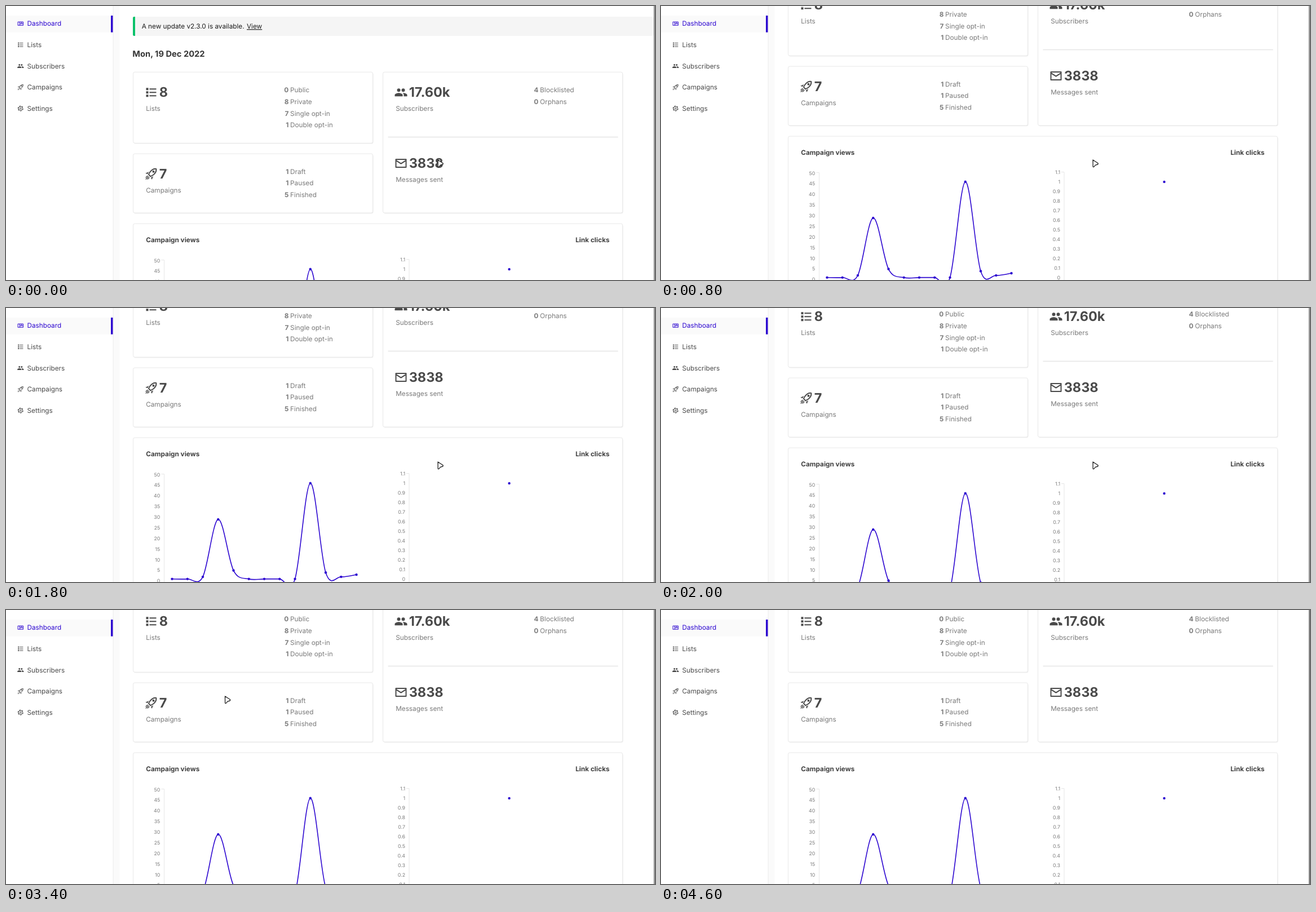
These frames come from a looping animation (1151 px wide and 486 px high, 4.8 s). An HTML page:

```html
<!DOCTYPE html>
<html lang="en">
<head>
<meta charset="utf-8">
<title>Dashboard</title>
<style>
  html, body { margin: 0; width: 100%; height: 100%; overflow: hidden; background: #fff; }
  svg { display: block; width: 100vw; height: 100vh; }
  text { font: 400 11.75px Inter, sans-serif; fill: #7a7a7a; text-rendering: geometricPrecision; }
  .bold { font-weight: 700; }
  .count { font-size: 23.5px; font-weight: 700; fill: #4a4a4a; }
  .head { font-weight: 700; fill: #404040; }
  .date { font-size: 14.69px; font-weight: 700; fill: #363636; }
  .note { fill: #1c1c1c; }
  .link { fill: #1c1c1c; text-decoration: underline; }
  .nav { fill: currentColor; }
  .tick { font-size: 8.8px; fill: #7d7d7d; }
  .end { text-anchor: end; }
  .axis { fill: none; stroke: #e6e6e6; }
</style>
</head>
<body>
<svg viewBox="0 0 1151 486" preserveAspectRatio="none">
  <rect width="1151" height="486" fill="#fff"/>
  <g id="page"></g>
  <g id="side"></g>
  <rect x="1149" width="1" height="486" fill="#4c4c4c"/>
  <rect id="edge" x="1150" width="1" height="486"/>
  <path id="cursor" d="M.7 .4L9.2 5.9Q10.6 7.2 9.2 8.4L5.2 9.5 2.5 12.7Q1 13.6 .8 12Z"
    fill="#fff" stroke="#1e1e1e" stroke-width="1.3" stroke-linejoin="round"/>
</svg>
<script>
const BLUE = '#2c06d0', INK = '#4a4a4a', LOOP = 4800;
const byId = id => document.getElementById(id);

function add(parent, name, attrs, content) {
  const el = document.createElementNS('http://www.w3.org/2000/svg', name);
  for (const key in attrs) el.setAttribute(key, attrs[key]);
  if (content !== undefined) el.textContent = content;
  parent.append(el);
  return el;
}
const label = (parent, x, y, content, cls = '', more = {}) =>
  add(parent, 'text', { x, y, class: cls, ...more }, content);

// Icons on a 24-unit grid: f = filled path, s = stroked path, w = line width
const icons = {
  board: [{ s: 'M3 6H21V18H3ZM9.5 6V18M9.5 12H21M15.5 6V12', w: 2 }],
  list: [{ f: 'M3 4h4v4h-4zM3 10h4v4h-4zM3 16h4v4h-4zM9 5h12v2h-12zM9 11h12v2h-12zM9 17h12v2h-12z' }],
  people: [{ f: 'M5 8a3 3 0 0 1 6 0a3 3 0 0 1 -6 0M13 8a3 3 0 0 1 6 0a3 3 0 0 1 -6 0' +
    'M1 19V16.5C1 14.2 5.7 13 8 13S15 14.2 15 16.5V19ZM17 19V16.5Q17 14.4 15 13.05C18 12.8 23 14.2 23 16.5V19Z' }],
  rocket: [
    { s: 'M20.8 3.2C17 2.3 13.5 4.8 11.7 6.6 9.6 8.7 8.3 11 7.5 13.1L10.7 16.5C13 15.6 15.4 14.3 17.4 12.3 20.8 8.9 21.2 5.5 20.8 3.2Z', w: 2 },
    { s: 'M2.3 21.7L7.5 16.5M2.2 18.8L5.8 15.2M5.2 21.8L8.9 18.1', w: 1.4 },
    { f: 'M14 8a2 2 0 0 1 4 0a2 2 0 0 1 -4 0M13.1 22.2L11.5 18.4Q13.8 17.5 15.9 16.1ZM5.6 12.5L1.8 10.9 7.9 8.1Q6.5 10.2 5.6 12.5Z' }
  ],
  mail: [{ s: 'M3 5H21V19H3ZM3 7L12 12.7 21 7', w: 2 }],
  cog: [
    { s: 'M5 12a7 7 0 0 1 14 0a7 7 0 0 1 -14 0M9.5 12a2.5 2.5 0 0 1 5 0a2.5 2.5 0 0 1 -5 0', w: 1.9 },
    { s: 'M3.2 12a8.8 8.8 0 0 1 17.6 0a8.8 8.8 0 0 1 -17.6 0', w: 2.2, dash: '4.6 4.615' }
  ]
};
function icon(parent, name, cx, cy, scale) {
  const g = add(parent, 'g', {
    transform: `translate(${cx} ${cy}) scale(${scale}) translate(-12 -12)`, color: 'inherit'
  });
  g.removeAttribute('color');
  for (const part of icons[name]) {
    add(g, 'path', part.f
      ? { d: part.f, fill: 'currentColor' }
      : { d: part.s, fill: 'none', stroke: 'currentColor', 'stroke-width': part.w,
          'stroke-linejoin': 'round', 'stroke-dasharray': part.dash || 'none' });
  }
}

// Sidebar
const side = byId('side');
add(side, 'rect', { width: 190, height: 486, fill: '#fff' });
add(side, 'rect', { x: 190, width: 11.5, height: 486, fill: '#fafafa' });
add(side, 'rect', { x: 189.6, width: 1, height: 486, fill: '#ececec' });
add(side, 'rect', { y: 17, width: 186, height: 29.7, fill: '#fafafa' });
add(side, 'rect', { x: 186, y: 17, width: 3.5, height: 29.7, fill: BLUE });
const menu = [['Dashboard', 'board'], ['Lists', 'list'], ['Subscribers', 'people'],
  ['Campaigns', 'rocket'], ['Settings', 'cog']].map(([name, art], i) => {
  const y = 31.1 + 37.6 * i;
  const g = add(side, 'g', { color: i ? INK : BLUE });
  icon(g, art, 25.8, y + .2, .51);
  label(g, 37.5, y + 4.3, name, 'nav');
  return g;
});

// Page
const page = byId('page');
page.setAttribute('color', INK);

function card(x, y, w, h) {
  add(page, 'rect', { x: x + 1, y: y + 1.2, width: w, height: h, rx: 3.5, fill: '#ededed' });
  add(page, 'rect', { x, y, width: w, height: h, rx: 3, fill: '#fff', stroke: '#e8e8e8' });
}
function stat(x, y, art, count, name) {
  icon(page, art, x + 9, y + .5, 1);
  label(page, x + 23.2, y + 8.6, count, 'count');
  label(page, x - .3, y + 33.3, name);
}
function details(x, y, rows) {
  rows.forEach(([count, name], i) => {
    const base = y + 20.85 * i;
    label(page, x, base, count, 'bold end');
    label(page, x + 2.8, base, name);
  });
}

add(page, 'rect', { x: 225, y: 19, width: 923.5, height: 34, rx: 2.5, fill: '#f5f5f5' });
add(page, 'path', { d: 'M229 19V53H227Q225 53 225 51V21Q225 19 227 19Z', fill: '#0bc26b' });
label(page, 240.7, 40.2, 'A new update v2.3.0 is available.', 'note');
label(page, 427, 40.2, 'View', 'link');
label(page, 224.3, 89.6, 'Mon, 19 Dec 2022', 'date');

card(225.5, 117.2, 425, 126);
card(225.5, 262, 425, 105);
card(668.5, 117.2, 425, 249.8);
card(225.5, 386, 868, 400);
add(page, 'rect', { x: 677.5, y: 231.6, width: 408, height: 1.8, fill: '#e9e9e9' });

stat(248.5, 152.7, 'list', '8', 'Lists');
stat(248.5, 297.3, 'rocket', '7', 'Campaigns');
stat(691.5, 152.7, 'people', '17.60k', 'Subscribers');
stat(691.5, 278.4, 'mail', '3838', 'Messages sent');
details(501.3, 152.9, [[0, 'Public'], [8, 'Private'], [7, 'Single opt-in'], [1, 'Double opt-in']]);
details(501.3, 297.6, [[1, 'Draft'], [1, 'Paused'], [5, 'Finished']]);
details(944.3, 152.9, [[4, 'Blocklisted'], [0, 'Orphans']]);

label(page, 248.3, 419.2, 'Campaign views', 'head');
label(page, 1070.3, 419.2, 'Link clicks', 'head end');

// Charts
function axes(left, top, right, bottom) {
  add(page, 'path', { class: 'axis',
    d: `M${left - 5} ${top}H${left}V${bottom}H${left - 5}M${left} ${bottom + 5}V${bottom}H${right}V${bottom + 5}` });
}
const dot = (x, y) => add(page, 'circle', { cx: x, cy: y, r: 2.2, fill: BLUE });
function dateLabel(x, content) {
  label(page, 0, 0, content, 'tick end', { transform: `translate(${x + 3.6} 664.6) rotate(-45)` });
}

axes(280.5, 450.5, 634.5, 653.5);
for (let i = 0; i <= 10; i++) label(page, 273.3, 643.3 - 18.88 * i, i * 5, 'tick end');
const views = [1, 1, 2, 29, 5, 1, 1, 1, 1, 46, 4, 2, 3]
  .map((v, i) => [294.5 + 27.25 * i, 640.4 - 3.776 * v]);
const at = i => views[Math.max(0, Math.min(views.length - 1, i))];
let curve = 'M' + views[0];
for (let i = 0; i < views.length - 1; i++) {
  const [a, b, c, d] = [at(i - 1), at(i), at(i + 1), at(i + 2)];
  const out = b.map((v, k) => v + (c[k] - a[k]) / 6);
  const into = c.map((v, k) => v - (d[k] - b[k]) / 6);
  curve += `C${out} ${into} ${c}`;
}
add(page, 'path', { d: curve, fill: 'none', stroke: BLUE, 'stroke-width': 1.6 });
views.forEach(p => dot(...p));
['26 Oct', '30 Oct', '02 Nov', '04 Nov', '10 Nov', '19 Nov', '23 Nov']
  .forEach((name, i) => dateLabel(294.5 + 54.5 * i, name));

axes(715, 449.5, 1069.5, 654.5);
for (let i = -1; i <= 11; i++) label(page, 708, 640.3 - 17.07 * i, String(i / 10), 'tick end');
dot(892.5, 466.9);
dateLabel(892.5, '18 Nov');

// Motion: [start ms, value], each held until the next
const scroll = [[0, 0], [500, 100.5], [800, 155], [900, 193], [1800, 156], [1900, 144],
  [2000, 138], [2800, 133.5], [3400, 133]];
const pointer = [[0, [765.3, 272.6]], [3400, [387.8, 152.6]], [3600, [343.6, 130.6]],
  [3800, [183, 66]], [3900, [165, 52.4]], [4100, [60.8, -1.8]], [4300, [-40, -40]]];
const hold = (steps, t) => steps.filter(s => s[0] <= t).pop()[1];

function draw(t) {
  page.setAttribute('transform', `translate(0 ${-hold(scroll, t)})`);
  byId('cursor').setAttribute('transform', `translate(${hold(pointer, t)})`);
  menu[1].setAttribute('color', t >= 3800 && t < 3900 ? BLUE : INK);
  byId('edge').setAttribute('fill', t >= 4600 ? '#a8a8a8' : '#cccccc');
}
const start = performance.now();
function tick(now) {
  draw(Math.max(0, now - start) % LOOP);
  requestAnimationFrame(tick);
}
draw(0);
requestAnimationFrame(tick);
</script>
</body>
</html>
```
